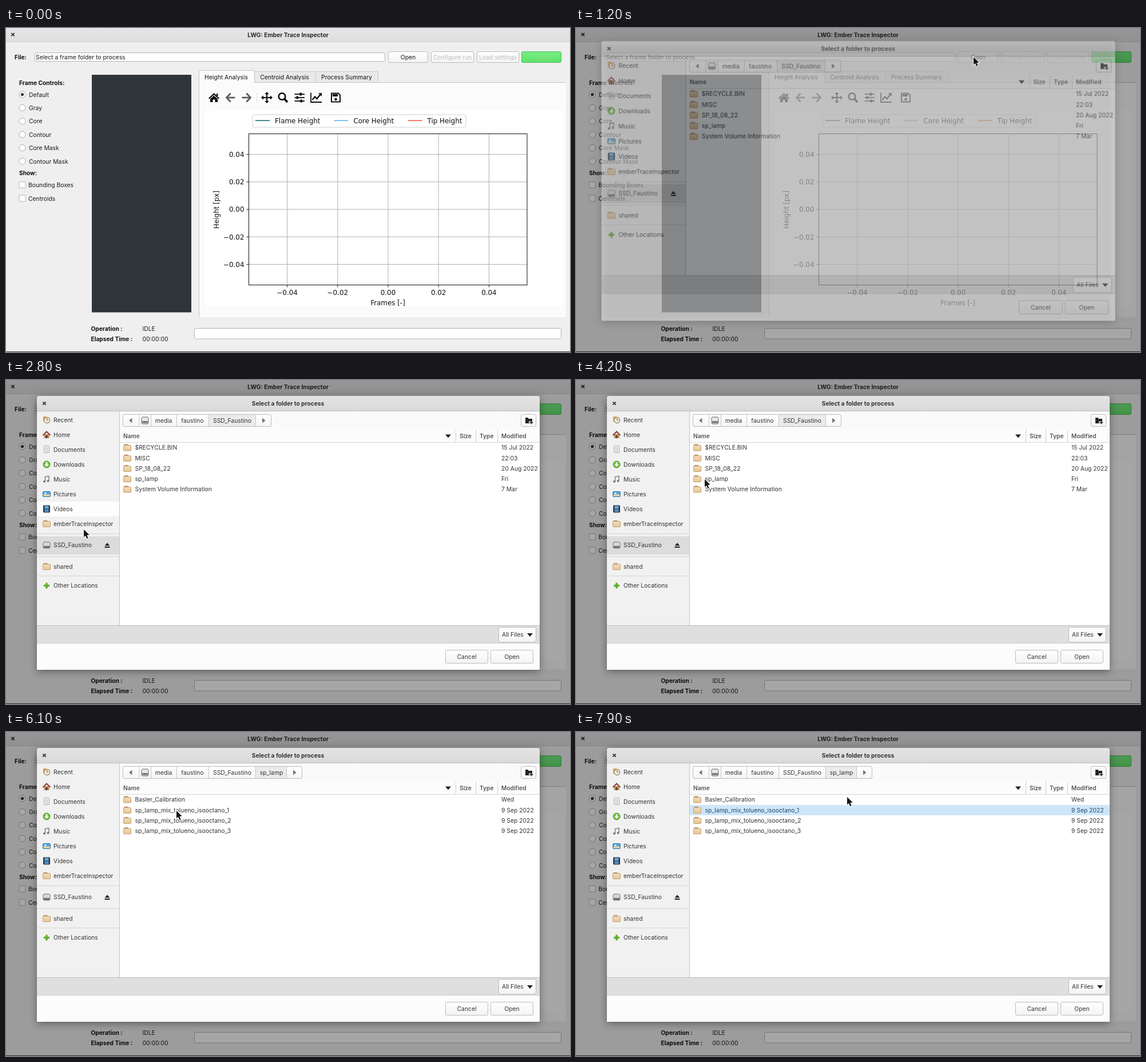
Recreate the animation shown at these times as an HTML page with a canvas. Size 986 px wide and 568 px high, loop 8 s.

```html
<!DOCTYPE html>
<html lang="en">
<head>
<meta charset="utf-8">
<title>Ember Trace Inspector</title>
<style>
html, body { margin: 0; width: 100%; height: 100%; overflow: hidden; background: #efefef; }
canvas { display: block; }
</style>
</head>
<body>
<canvas id="stage" width="986" height="568"></canvas>
<script>
const W = 986, H = 568, LOOP = 8000;
const stage = document.getElementById('stage').getContext('2d');
const layer = () => Object.assign(document.createElement('canvas'), { width: W, height: H }).getContext('2d');
const appLayer = layer(), dialogLayer = layer();
let g = stage;

const UI = '10.35px Inter, sans-serif';
const BOLD = '700 10.2px Inter, sans-serif';
const HEAD = '600 10.2px Inter, sans-serif';
const PLOT = '11.9px "DejaVu Sans", sans-serif';

// Drawing helpers
function text(s, x, y, color = '#1a1a1a', font = UI, align = 'left') {
  g.font = font;
  g.textAlign = align;
  g.fillStyle = color;
  g.fillText(s, x, y);
}
function rect(x, y, w, h, fill) {
  g.fillStyle = fill;
  g.fillRect(x, y, w, h);
}
function box(x, y, w, h, fill, edge, r = 2.5) {
  g.beginPath();
  g.roundRect(x + .5, y + .5, w - 1, h - 1, r);
  g.fillStyle = fill;
  g.fill();
  g.strokeStyle = edge;
  g.lineWidth = 1;
  g.stroke();
}
function shade(y, h, a, b) {
  const s = g.createLinearGradient(0, y, 0, y + h);
  s.addColorStop(0, a);
  s.addColorStop(1, b);
  return s;
}
function button(x, y, w, h, label, color = '#1a1a1a') {
  box(x, y, w, h, shade(y, h, '#ffffff', '#f3f3f3'), '#bcbcbc');
  text(label, x + w / 2, y + h / 2 + 3.8, color, UI, 'center');
}
function line(color, width, ...p) {
  g.beginPath();
  for (let i = 0; i < p.length; i += 2) g.lineTo(p[i], p[i + 1]);
  g.strokeStyle = color;
  g.lineWidth = width;
  g.stroke();
}
function poly(color, ...p) {
  g.beginPath();
  for (let i = 0; i < p.length; i += 2) g.lineTo(p[i], p[i + 1]);
  g.fillStyle = color;
  g.fill();
}
function circle(x, y, r, fill, edge, width = 1) {
  g.beginPath();
  g.arc(x, y, r, 0, 7);
  if (fill) { g.fillStyle = fill; g.fill(); }
  if (edge) { g.strokeStyle = edge; g.lineWidth = width; g.stroke(); }
}
function cross(x, y) {
  line('#333', 1.7, x - 2.7, y - 2.7, x + 2.7, y + 2.7);
  line('#333', 1.7, x + 2.7, y - 2.7, x - 2.7, y + 2.7);
}
function down(x, y) {
  poly('#222', x - 5, y - 2.5, x + 5, y - 2.5, x, y + 3.5);
}

// Main window
function toolbar() {
  const k = '#0c0c0c', y = 122;
  poly(k, 354, 123, 363.5, 114, 373, 123, 371.5, 124.5, 363.5, 117, 355.5, 124.5);
  poly(k, 357, 124.5, 363.5, 118.5, 370, 124.5, 370, 130, 365.5, 130, 365.5, 125.5, 361.5, 125.5, 361.5, 130, 357, 130);
  rect(368, 115, 2.5, 4, k);
  for (const [x, d] of [[392.5, 1], [420.5, -1]]) {
    line('#5c5c5c', 2.8, x, 114.5, x - 7 * d, y, x, 129.5);
    line('#5c5c5c', 2.8, x - 6 * d, y, x + 8 * d, y);
  }
  rect(438, 113, 1, 18, '#e4e4e4');
  line(k, 2.2, 448, y, 464, y);
  line(k, 2.2, 456, 114, 456, 130);
  for (let i = 0; i < 4; i++) {
    g.save();
    g.translate(456, y);
    g.rotate(i * Math.PI / 2);
    poly(k, -3.8, -6, 0, -10, 3.8, -6);
    g.restore();
  }
  circle(482.5, 120, 5.8, null, k, 2.6);
  line(k, 3.6, 486.5, 124, 492, 130);
  [[116, 515], [122, 509], [128, 516]].forEach(([ly, kx]) => {
    line(k, 1.8, 504.5, ly, 522, ly);
    rect(kx - 1.5, ly - 2.5, 3.5, 5, k);
  });
  line(k, 1.8, 533, 113.5, 533, 130, 552, 130);
  line(k, 2.4, 535.5, 126, 540, 120.5, 543.5, 124, 550, 116);
  poly(k, 546, 114, 552, 114, 552, 120);
  line(k, 2, 569, 114.5, 581, 114.5, 584, 117.5, 584, 129.5, 569, 129.5, 569, 113.5);
  rect(571, 116, 9, 4, k);
  circle(576.5, 125, 2.3, k);
}

function chart() {
  rect(347, 144, 627, 344, '#fff');
  const px = i => 668 + i * 88.2, py = i => 318 - i * 48.2;
  const label = i => (i < 0 ? '\u2212' : '') + Math.abs(i * .02).toFixed(2);
  for (let i = -2; i < 3; i++) {
    const x = px(i), y = py(i);
    line('#b0b0b0', 1, x, 186, x, 450);
    line('#b0b0b0', 1, 425, y, 911, y);
    line('#111', 1, x, 450, x, 454.5);
    line('#111', 1, 420.5, y, 425, y);
    text(label(i), x, 468, '#111', PLOT, 'center');
    text(label(i), 416.5, y + 4.3, '#111', PLOT, 'right');
  }
  g.strokeStyle = '#111';
  g.strokeRect(424.5, 185.5, 486.5, 265);
  text('Frames [-]', 667.5, 485.5, '#111', PLOT, 'center');
  g.save();
  g.translate(372, 318.5);
  g.rotate(-Math.PI / 2);
  text('Height [px]', 0, 0, '#111', PLOT, 'center');
  g.restore();
  box(430.5, 151.5, 374, 23, '#fff', '#cfcfcf', 3);
  [['Flame', 436, '#0f6a70'], ['Core', 573.5, '#62b5ea'], ['Tip', 702.5, '#f25c3a']].forEach(([name, x, c]) => {
    line(c, 1.6, x, 162.3, x + 25, 162.3);
    text(name + ' Height', x + 34, 166.5, '#111', PLOT);
  });
}

function app() {
  rect(0, 0, W, H, '#efefef');
  rect(0, 0, W, 24, shade(0, 24, '#e6e6e6', '#dedede'));
  rect(0, 24, W, 1, '#d2d2d2');
  cross(12, 11.5);
  text('LWG: Ember Trace Inspector', 493, 15.7, '#2b2b2b', BOLD, 'center');

  text('File:', 15, 54.5, '#111', BOLD);
  box(50, 43, 613, 16, '#fff', '#b4b4b4');
  text('Select a frame folder to process', 52, 54.5);
  button(668, 41, 70, 20, 'Open');
  button(743, 41, 75, 20, 'Configure run', '#bdbdbd');
  button(823, 41, 74, 20, 'Load settings', '#bdbdbd');
  box(901, 41, 70, 20, shade(41, 20, '#77ee80', '#5fe26a'), '#55b95f');
  text('Start', 936, 54.8, '#8fdc94', UI, 'center');

  text('Frame Controls:', 23, 100, '#111', BOLD);
  ['Default', 'Gray', 'Core', 'Contour', 'Core Mask', 'Contour Mask'].forEach((s, i) => {
    const y = 116.5 + i * 23.4;
    circle(28.5, y, 5.6, '#fff', '#aaa');
    if (!i) circle(28.5, y, 2.6, '#333');
    text(s, 40, y + 4);
  });
  text('Show:', 23, 258.3, '#111', BOLD);
  ['Bounding Boxes', 'Centroids'].forEach((s, i) => {
    box(22.5, 269 + i * 23.5, 12, 12, '#fff', '#b4b4b4', 1);
    text(s, 39, 279 + i * 23.5);
  });
  rect(150, 82, 174, 416.5, '#2f3439');

  rect(337, 95, 642, 412, '#fbfbfb');
  rect(337, 95, 642, 1, '#c6c6c6');
  rect(337, 75, 1, 432, '#c6c6c6');
  box(434, 76, 108, 20, '#e9e9e9', '#c6c6c6', 1.5);
  box(541, 76, 110, 20, '#e9e9e9', '#c6c6c6', 1.5);
  box(337, 74, 98, 23, '#fbfbfb', '#c6c6c6', 1.5);
  rect(338, 95, 96, 3, '#fbfbfb');
  text('Height Analysis', 385, 89.5, '#111', UI, 'center');
  text('Centroid Analysis', 487, 90, '#111', UI, 'center');
  text('Process Summary', 595.5, 90, '#111', UI, 'center');
  toolbar();
  chart();

  text('Operation :', 148.5, 530.7, '#111', BOLD);
  text('IDLE', 238.5, 530.7);
  text('Elapsed Time :', 148.5, 549, '#111', BOLD);
  text('00:00:00', 238.5, 549);
  box(329, 526, 642, 19.5, '#fff', '#b4b4b4');
  rect(0, 567, W, 1, '#3a3a3a');
}

// Folder dialog
function folder(x, y) {
  box(x - 6, y - 6, 8, 5, '#cfa878', '#b08a5c', 1);
  box(x - 7, y - 4.5, 14, 10.5, shade(y - 4, 10, '#f3dfbd', '#e5c493'), '#c39c6b', 1);
}
function drive(x, y) {
  box(x - 6.5, y - 6.5, 13, 13, '#e8e8e8', '#666', 2);
  rect(x - 5, y + 1, 10, 3.5, '#777');
}
const icons = [
  (x, y) => {
    poly('#d8a33f', x - 6, y - 6, x, y - 6, x - 6, y + 4);
    circle(x + .8, y + .5, 5, '#f4f4f4', '#a88b50', 1.3);
    line('#555', 1, x + .8, y - 3, x + .8, y + .5, x + 3.5, y + .5);
  },
  (x, y) => {
    rect(x - 4.5, y - 1, 9, 7, '#bd8d62');
    rect(x - 1.5, y + 1, 3, 5, '#5d3c28');
    line('#913b2b', 2, x - 6.5, y + 1, x, y - 5.5, x + 6.5, y + 1);
  },
  (x, y) => {
    box(x - 5, y - 7, 10, 13, '#f6f6f6', '#a8a8a8', 1);
    for (let i = 0; i < 4; i++) rect(x - 3, y - 4 + i * 2.3, 6, .8, '#aaa');
  },
  (x, y) => {
    circle(x, y, 6, '#6cbf3b', '#4c9a27');
    poly('#fff', x - 1.5, y - 4, x + 1.5, y - 4, x + 1.5, y, x + 4, y, x, y + 4, x - 4, y, x - 1.5, y);
  },
  (x, y) => {
    line('#7a7a7a', 1.4, x - 2.5, y + 4, x - 2.5, y - 4.5, x + 4, y - 5.5, x + 4, y + 2.5);
    circle(x - 4, y + 4, 2, '#777');
    circle(x + 2.5, y + 3, 2, '#777');
  },
  (x, y) => {
    box(x - 7, y - 5, 14, 10, '#4fa5dd', '#3d7ba6', 1);
    rect(x - 5.5, y + .5, 11, 3, '#ead9a0');
    circle(x - 2, y - 1.5, 1.5, '#fff');
  },
  (x, y) => {
    box(x - 6, y - 6.5, 12, 13, '#333b44', '#2b333c', 1);
    rect(x - 3.5, y - 5.5, 7, 5, '#5fa8e0');
    rect(x - 3.5, y + .5, 7, 5, '#4b91cc');
  },
  folder,
  (x, y) => {
    box(x - 6.5, y - 6, 13, 12, '#d6d6d6', '#777', 2);
    rect(x - 5.5, y + 1.5, 11, 3.5, '#6d6d6d');
  },
  folder,
  (x, y) => {
    line('#5fae2e', 3.4, x - 5, y, x + 5, y);
    line('#5fae2e', 3.4, x, y - 5, x, y + 5);
  }
];
const DISK = 'SSD_Faustino';
const places = ['Recent', 'Home', 'Documents', 'Downloads', 'Music', 'Pictures', 'Videos',
  'emberTraceInspector', DISK, 'shared', 'Other Locations'];
const placeY = i => i < 8 ? 70 + i * 26 : [289.5, 327, 360.5][i - 8];
const rootFiles = [['$RECYCLE.BIN', '15 Jul 2022'], ['MISC', '22:03'], ['SP_18_08_22', '20 Aug 2022'],
  ['sp_lamp', 'Fri'], ['System Volume Information', '7 Mar']];
const lampFiles = [['Basler_Calibration', 'Wed'],
  ...[1, 2, 3].map(n => ['sp_lamp_mix_tolueno_isooctano_' + n, '9 Sep 2022'])];

function pathBar(inLamp) {
  const end = inLamp ? 518 : 464;
  box(204, 60, end - 204, 22, shade(60, 22, '#ffffff', '#f5f5f5'), '#bcbcbc');
  if (inLamp) rect(437, 61, 53, 20, '#ebebeb');
  else rect(355, 61, 82, 20, '#ebebeb');
  [232, 253, 298, 354, 436].concat(inLamp ? 490 : []).forEach(x => rect(x, 61, 1, 20, '#c6c6c6'));
  poly('#777', 220.5, 66.5, 220.5, 75.5, 215, 71);
  poly('#777', end - 16, 66.5, end - 16, 75.5, end - 10.5, 71);
  drive(243, 71);
  const crumbs = [['media', 275.5], ['faustino', 326], [DISK, 395.5]];
  if (inLamp) crumbs.push(['sp_lamp', 464]);
  crumbs.forEach(([s, x]) => text(s, x, 74.8, '#333', UI, 'center'));
}

function dialog(t, hover) {
  const ink = '#333', inLamp = t >= 4500;
  g.clearRect(0, 0, W, H);
  g.save();
  g.beginPath();
  g.roundRect(54, 28, 879, 480, [4, 4, 1, 1]);
  g.clip();
  rect(54, 28, 879, 480, '#fff');
  rect(54, 28, 879, 26, shade(28, 26, '#e4e4e4', '#d9d9d9'));
  rect(54, 54, 879, 1, '#bdbdbd');
  cross(67, 41);
  text('Select a folder to process', 493, 45, ink, BOLD, 'center');

  rect(54, 55, 144, 375, '#f1f1f1');
  if (hover >= 0 && hover != 8) rect(54, placeY(hover) - 13, 144, 26, '#fdfdfd');
  if (!inLamp) rect(54, 274, 144, 32, '#dcdcdc');
  [269, 309, 343].forEach(y => rect(54, y, 144, 1, '#d4d4d4'));
  places.forEach((s, i) => {
    icons[i](71, placeY(i));
    text(s, 83, placeY(i) + 3.8, ink);
  });
  poly('#222', 172.5, 290.5, 181.5, 290.5, 177, 285.5);
  rect(172.5, 292, 9, 2, '#222');
  rect(198, 55, 1, 375, '#c4c4c4');

  rect(199, 55, 734, 32, '#fafafa');
  pathBar(inLamp);
  box(900, 60, 27, 22, shade(60, 22, '#fff', '#f5f5f5'), '#bcbcbc');
  rect(908, 66, 5, 3, '#222');
  rect(908, 68, 12, 8, '#222');
  line('#fafafa', 3, 914, 74, 923, 74);
  line('#222', 1.4, 915.5, 74.5, 921.5, 74.5);
  line('#222', 1.4, 918.5, 71.5, 918.5, 77.5);
  rect(199, 87, 734, 22, '#fcfcfc');
  rect(199, 109, 734, 1, '#d6d6d6');
  [786, 821, 859].forEach(x => rect(x, 87, 1, 22, '#d0d0d0'));
  [['Name', 205], ['Size', 793], ['Type', 828], ['Modified', 866]]
    .forEach(([s, x]) => text(s, x, 101.8, '#555', HEAD));
  down(773, 98);

  const selected = inLamp ? (t >= 6300 ? 1 : -1) : (t >= 4300 ? 3 : -1);
  (inLamp ? lampFiles : rootFiles).forEach(([name, date], i) => {
    const y = 118.5 + i * 18.25, on = i == selected;
    if (on) rect(199, y - 9, 734, 18.3, '#cde6fa');
    folder(212, y);
    text(name, 225.5, y + 3.8, on ? '#1f4567' : ink);
    text(date, 866, y + 3.8, on ? '#1f4567' : ink);
  });

  rect(54, 430, 879, 1, '#bdbdbd');
  rect(54, 431, 879, 30, '#dfdfdf');
  rect(54, 461, 879, 1, '#cccccc');
  rect(54, 462, 879, 46, '#fcfcfc');
  box(861, 433, 66, 27, shade(433, 27, '#fff', '#f3f3f3'), '#bcbcbc');
  text('All Files', 867, 450.3, ink);
  down(916, 446.5);
  button(768, 473, 75, 24, 'Cancel', ink);
  button(847, 473, 75, 24, 'Open', ink);
  g.restore();
}

// Pointer path: time, x, y
const path = [[200, 64, 555], [700, 860, 300], [1000, 695, 51], [1300, 695, 51], [2000, 420, 95],
  [2400, 248, 150], [2500, 248, 150], [2700, 165, 228], [2800, 136, 262], [3000, 70, 293],
  [3100, 128, 293], [3200, 128, 293], [4000, 225, 174], [5000, 225, 174], [5600, 298, 138],
  [6700, 298, 138], [7600, 620, 444], [7900, 474, 114]];
function pointerAt(t) {
  const i = path.findIndex(p => p[0] > t);
  if (i < 0) return path[path.length - 1].slice(1);
  if (!i) return null;
  const [t0, x0, y0] = path[i - 1], [t1, x1, y1] = path[i], u = (t - t0) / (t1 - t0);
  return [x0 + (x1 - x0) * u, y0 + (y1 - y0) * u];
}
function pointer(x, y) {
  g.save();
  g.translate(x, y);
  g.beginPath();
  [[0, 0], [0, 13.5], [3, 10.8], [5.2, 16], [7.6, 15], [5.4, 10], [9.6, 9.6]].forEach(p => g.lineTo(...p));
  g.closePath();
  g.strokeStyle = '#fff';
  g.lineWidth = 1.8;
  g.stroke();
  g.fillStyle = '#151515';
  g.fill();
  g.restore();
}

// The sidebar highlight trails the pointer by one step.
function hoverAt(t) {
  const p = pointerAt(t - 100);
  if (!p || p[0] < 54 || p[0] > 198) return -1;
  return places.findIndex((_, i) => Math.abs(p[1] - placeY(i)) < 13);
}

function draw(t) {
  g = stage;
  g.drawImage(appLayer.canvas, 0, 0);
  if (t >= 1200) {
    const [alpha, scale] = t < 1300 ? [.5, 1.0216] : t < 1400 ? [.93, 1.0025] : [1, 1];
    rect(0, 0, W, H, 'rgba(0,0,0,.35)');
    g = dialogLayer;
    dialog(t, hoverAt(t));
    g = stage;
    g.save();
    g.globalAlpha = alpha;
    g.shadowColor = 'rgba(0,0,0,.4)';
    g.shadowBlur = 14;
    g.shadowOffsetY = 3;
    g.translate(493.3, 268);
    g.scale(scale, scale);
    g.drawImage(dialogLayer.canvas, -493.3, -268);
    g.restore();
  }
  const p = pointerAt(t);
  if (p) pointer(...p);
}

g = appLayer;
app();
const start = performance.now();
function tick() {
  const t = (performance.now() - start) % LOOP;
  draw(Math.floor(t / 100) * 100);
  requestAnimationFrame(tick);
}
tick();
</script>
</body>
</html>
```
